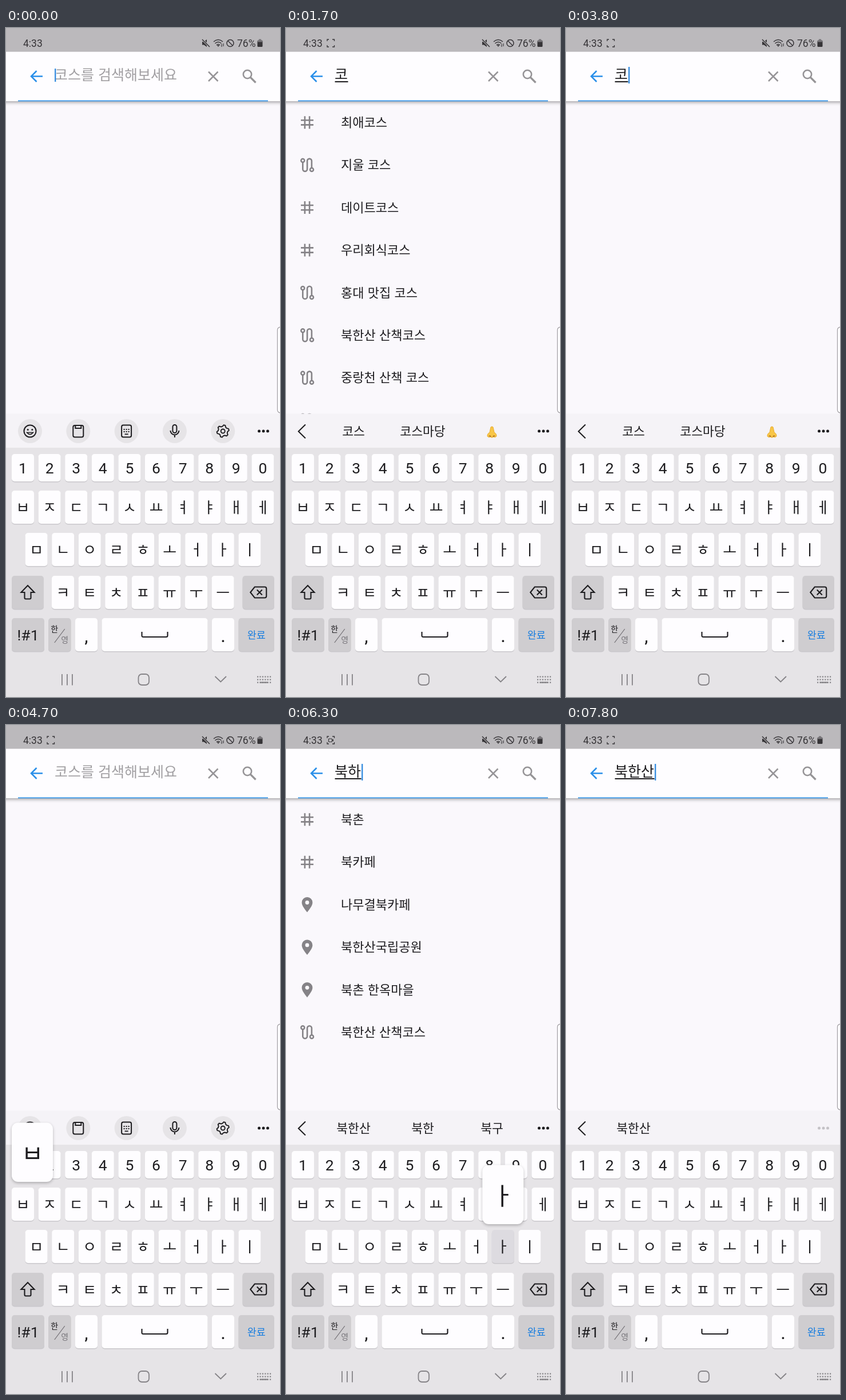
Recreate the animation shown at these times as an HTML page with a canvas. Size 479x1170 px, loop 8000 ms.

```html
<!DOCTYPE html>
<html lang="ko">
<head>
<meta charset="utf-8">
<title>코스 검색</title>
<style>
  html, body { margin: 0; width: 100%; height: 100%; overflow: hidden; background: #faf8fc; }
  canvas { display: block; }
</style>
</head>
<body>
<canvas id="stage" width="479" height="1170"></canvas>
<script>
const ctx = document.getElementById('stage').getContext('2d');
const LOOP = 8000;
const KR = '"Noto Sans CJK KR", "Noto Sans CJK", sans-serif';
const LATIN = 'Roboto, sans-serif';
const INK = '#1d1c1f', GREY = '#858387', BLUE = '#2a8fe9';

// Each stroke: press time, key, resulting text
const strokes = [
  [1000, 'ㅋ', 'ㅋ'], [1050, 'ㅗ', '코'],
  [2300, 'ㅅ', '콧'], [2450, 'ㅡ', '코스'],
  [3400, 'del', '콧'], [3600, 'del', '코'], [3800, 'del', 'ㅋ'], [3950, 'del', ''],
  [4690, 'ㅂ', 'ㅂ'], [4900, 'ㅜ', '부'], [5050, 'ㄱ', '북'],
  [6000, 'ㅎ', '북ㅎ'], [6200, 'ㅏ', '북하'], [6450, 'ㄴ', '북한'],
  [6950, 'ㅅ', '북한ㅅ'], [7150, 'ㅏ', '북한사'], [7450, 'ㄴ', '북한산']
];
const LAG = 50, POPUP = 300;

// First character picks the icon: # tag, ~ route, @ place
const courses = ['#최애코스', '~지울 코스', '#데이트코스', '#우리회식코스', '~홍대 맛집 코스',
  '~북한산 산책코스', '~중랑천 산책 코스', '~'];
const books = ['#북촌', '#북카페', '@나무결북카페', '@북한산국립공원', '@북촌 한옥마을', '~북한산 산책코스'];
const parks = ['@북한산국립공원', '~북한산 산책코스'];
const results = [[0, []], [1500, courses], [2750, []], [2900, courses], [3800, []], [3950, courses],
  [4150, []], [5490, books], [6400, []], [6880, parks], [7400, []]];

const co = ['코스', '코스마당', 'nose'];
const hints = [[0, null], [1200, co], [2600, ['코스마당', '코스프레', '코스길']], [3750, co], [4150, null],
  [5200, ['북한산', '북한', '북구']], [6600, ['북한산', '북한의', '북한이']], [7600, ['북한산']]];

const at = (track, t) => track.filter(e => e[0] <= t).pop()[1];

const STEP = 46.6;
const keys = [];
function addRow(chars, x, y, h) {
  [...chars].forEach((label, i) => keys.push({ label, x: x + i * STEP, y, w: 39, h }));
}
addRow('1234567890', 10, 745, 48);
addRow('ㅂㅈㄷㄱㅅㅛㅕㅑㅐㅔ', 10, 809, 58);
addRow('ㅁㄴㅇㄹㅎㅗㅓㅏㅣ', 33.6, 883, 58);
addRow('ㅋㅌㅊㅍㅠㅜㅡ', 80, 958, 58);
const addKey = (label, x, y, w, dark) => keys.push({ label, x, y, w, h: 58, dark });
addKey('shift', 10, 958, 56, true);
addKey('del', 413.5, 958, 55.5, true);
addKey('!#1', 10, 1032, 57, true);
addKey('lang', 74, 1032, 39.5, true);
addKey(',', 121, 1032, 39);
addKey('space', 167.5, 1032, 185);
addKey('.', 360, 1032, 39);
addKey('완료', 406.5, 1032, 62.5, true);

function rect(x, y, w, h, color) {
  ctx.fillStyle = color;
  ctx.fillRect(x, y, w, h);
}
function box(x, y, w, h, r, fill, stroke, lw = 2) {
  ctx.beginPath();
  ctx.roundRect(x, y, w, h, r);
  if (fill) { ctx.fillStyle = fill; ctx.fill(); }
  if (stroke) { ctx.strokeStyle = stroke; ctx.lineWidth = lw; ctx.stroke(); }
}
function path(d, color, lw, fill) {
  const p = new Path2D(d);
  if (fill) { ctx.fillStyle = fill; ctx.fill(p); }
  if (color) { ctx.strokeStyle = color; ctx.lineWidth = lw; ctx.stroke(p); }
}
function disc(x, y, r, fill, stroke, lw) {
  ctx.beginPath();
  ctx.arc(x, y, r, 0, 7);
  if (fill) { ctx.fillStyle = fill; ctx.fill(); }
  if (stroke) { ctx.strokeStyle = stroke; ctx.lineWidth = lw; ctx.stroke(); }
}
function text(s, x, y, size, { color = INK, font = KR, align = 'left', weight = 400 } = {}) {
  ctx.font = `${weight} ${size}px ${font}`;
  ctx.wordSpacing = `${size * .06}px`;
  ctx.textAlign = align;
  ctx.fillStyle = color;
  ctx.fillText(s, x, y);
}
function shifted(x, y, draw) {
  ctx.save();
  ctx.translate(x, y);
  draw();
  ctx.restore();
}

function statusBar(t) {
  const c = '#363437';
  rect(0, 0, 479, 41.5, '#bbb9bc');
  text('4:33', 30, 32.5, 17.5, { color: c, font: LATIN });
  if (t >= 100) {
    path('M72 23V20H75M81 20H84.5V23M84.5 30V33H81M75 33H72V30', c, 1.3);
    if (t % 1000 < 500) {
      box(74.5, 24, 6, 5.5, 1, null, c, 1.2);
      path('M80.5 26.5L83 24.5V29Z', null, 0, c);
    }
  }
  path('M343 24H346L351 20V33L346 29.5H343Z', null, 0, c);
  path('M343 20L356 33', '#bbb9bc', 3.5);
  path('M343 20L356 33', c, 1.5);
  path('M363 24Q371 17 379 24M365.5 27Q371 22 376.5 27M368 30Q371 27 374 30', c, 1.5);
  path('M369 30L371 33L373 30Z', null, 0, c);
  path('M377 28V33M380 27V32', c, 1.1);
  disc(392, 26.5, 6, null, c, 1.5);
  path('M388 22.5L396 30.5', c, 1.5);
  text('76%', 404, 32.5, 17.5, { color: c, font: LATIN });
  box(439.5, 21.5, 9, 11.5, 1.5, c);
  rect(442, 19.5, 4, 2, '#777579');
  rect(440, 22, 8, 2.5, '#777579');
}

function searchBar(t, value, cursorOn) {
  ctx.save();
  ctx.shadowColor = 'rgba(0,0,0,.38)';
  ctx.shadowBlur = 6;
  ctx.shadowOffsetY = 2;
  rect(-10, 41.5, 499, 86.5, '#fefdff');
  ctx.restore();
  rect(21, 126.5, 437, 1.8, '#3a97e8');
  path('M64 84.5H45M53.5 75L44 84.5L53.5 94', BLUE, 2.5);
  path('M354 76.5L370.5 93M370.5 76.5L354 93', '#969497', 2.5);
  disc(422, 81, 7.2, null, '#969497', 2.6);
  path('M427 86L436.5 95.5', '#969497', 3.2);

  if (value) {
    text(value, 85, 90, 25);
    rect(85.5, 93, ctx.measureText(value).width, 2, INK);
  } else {
    text('코스를 검색해보세요', 85, 90.5, 25, { color: '#a19fa2' });
  }
  if (cursorOn) {
    const n = value.length;
    if (n) rect(86 + 23 * n, 68, 2.4, 29, '#3a8fe0');
    else rect(85, 71, 2.4, 23, '#3a8fe0');
  }
}

const listIcons = {
  '#': () => path('M-4.1 -11V11M4.1 -11V11M-11 -4.1H11M-11 4.1H11', GREY, 2.6),
  '~': () => {
    disc(-7.7, -8, 3, null, GREY, 2.5);
    disc(8, 8, 3, null, GREY, 2.5);
    path('M-7.7 -5V7A3.9 3.9 0 0 0 .1 7V-7.2A3.9 3.9 0 0 1 7.9 -7.2V5', GREY, 2.6);
  },
  '@': () => {
    path('M0 13.5C-4 8 -9.4 2 -9.4 -3.6A9.4 9.4 0 0 1 9.4 -3.6C9.4 2 4 8 0 13.5Z', null, 0, GREY);
    disc(0, -3.6, 3.4, '#faf8fc');
  }
};

function resultList(rows) {
  rows.forEach((row, i) => {
    const y = 165.3 + i * 74.4;
    shifted(37, y, listIcons[row[0]]);
    text(row.slice(1), 96, y + 7.7, 22);
  });
}

const tools = [
  () => {
    disc(0, 0, 10.5, null, INK, 2);
    disc(-3.8, -2.5, 1.5, INK);
    disc(3.8, -2.5, 1.5, INK);
    path('M-5.5 2.5Q0 9 5.5 2.5Z', INK, 1.5);
  },
  () => {
    box(-9, -10, 18, 20.5, 3, null, INK);
    path('M-5 -10V-5H5V-10', INK, 2);
  },
  () => {
    box(-8.5, -10.5, 17, 21, 3, null, INK);
    for (let i = 0; i < 6; i++) rect(-5 + i % 3 * 4, -4 + (i > 2) * 4, 2, 2, INK);
    rect(-3, 4.5, 6, 1.8, INK);
  },
  () => {
    box(-3.5, -11, 7, 14, 3.5, null, INK);
    path('M-7.5 -1A7.5 7.5 0 0 0 7.5 -1M0 6.5V11', INK, 2);
  },
  () => {
    ctx.beginPath();
    for (let i = 0; i < 24; i++) {
      const a = (i + .5) * Math.PI / 12, r = i % 4 < 2 ? 8.2 : 10.7;
      ctx.lineTo(r * Math.cos(a), r * Math.sin(a));
    }
    ctx.closePath();
    ctx.strokeStyle = INK;
    ctx.lineWidth = 1.9;
    ctx.stroke();
    disc(0, 0, 3.5, null, INK, 1.9);
  }
];

function nose(x, y) {
  shifted(x, y, () => {
    path('M-2 -9Q0 -11 2 -9L4 0Q9 3 8 7Q6 10 2 8Q0 11 -2 8Q-6 10 -8 7Q-9 3 -4 0Z', '#e8ad35', 1, '#f8c648');
    path('M-5 7Q-3 5 -2 8M5 7Q3 5 2 8', '#a96a20', 1.4);
  });
}

function hintStrip(words) {
  rect(0, 674.5, 479, 60, '#f5f3f7');
  const faded = words && words.length === 1;
  for (const x of [442.5, 450, 457.5]) disc(x, 705, 2.5, faded ? '#c4c2c6' : INK);
  if (!words) {
    tools.forEach((icon, i) => {
      const x = 42 + i * 84.3;
      disc(x, 705, 21, '#e6e4e7');
      shifted(x, 705, icon);
    });
    return;
  }
  path('M34 693.5L21.8 705.5L34 717.5', INK, 2);
  words.forEach((word, i) => {
    const x = 118 + i * 121;
    if (word === 'nose') nose(x, 707);
    else text(word, x, 713, 21.6, { align: 'center' });
  });
}

const glyphs = {
  shift: () => path('M0 -12L11.5 0H5.5V9.5Q5.5 11.5 3.5 11.5H-3.5Q-5.5 11.5 -5.5 9.5V0H-11.5Z', INK, 2.1),
  del: () => {
    path('M-14 0L-6.5 -9.5H11Q14 -9.5 14 -6.5V6.5Q14 9.5 11 9.5H-6.5Z', INK, 2.1);
    path('M-2.5 -4.5L6.5 4.5M6.5 -4.5L-2.5 4.5', INK, 2.1);
  },
  space: () => path('M-22.5 -5V1.5Q-22.5 4 -20 4H20Q22.5 4 22.5 1.5V-5', INK, 2.1),
  lang: () => {
    text('한', -9, -5, 14, { align: 'center' });
    path('M-9 14L9 -10', '#69676b', 1.1);
    text('영', 9, 14, 14, { align: 'center', color: '#77757a' });
  }
};

function drawKey(k, pressed) {
  const cx = k.x + k.w / 2, cy = k.y + k.h / 2;
  box(k.x, k.y + 1.5, k.w, k.h, 5, '#cac8cc');
  box(k.x, k.y, k.w, k.h, 5, pressed ? (k.dark ? '#b5b3b8' : '#dddbe0') : k.dark ? '#cfcdd0' : '#fefdff');
  if (glyphs[k.label]) shifted(cx, cy, glyphs[k.label]);
  else if (k.label === '완료') text(k.label, cx, cy + 6.5, 17.5, { color: '#167de0', align: 'center', weight: 500 });
  else if (/[ㄱ-ㅣ]/.test(k.label)) text(k.label, cx, cy + 10, 26, { align: 'center', weight: 500 });
  else if (/[,.]/.test(k.label)) text(k.label, cx, 1074, 27, { font: LATIN, align: 'center', weight: 500 });
  else text(k.label, cx, cy + 9.5, 26.5, { font: LATIN, align: 'center' });
}

function popup(k) {
  const cx = Math.min(433, Math.max(46, k.x + k.w / 2));
  const top = k.y - 113.5;
  ctx.save();
  ctx.shadowColor = 'rgba(0,0,0,.25)';
  ctx.shadowBlur = 5;
  ctx.shadowOffsetY = 2;
  box(cx - 36, top, 72, 103.5, 11, '#fefdff');
  ctx.restore();
  text(k.label, cx, top + 69, 42, { align: 'center', weight: 500 });
}

function navBar() {
  for (const x of [98, 107, 116]) rect(x - 1, 1130, 1.8, 19.5, GREY);
  box(231.5, 1130, 18.5, 19, 6, null, GREY, 1.8);
  path('M365.5 1134L375.3 1143.5L385 1134', GREY, 1.8);
  for (let row = 0; row < 3; row++)
    for (let i = 0; i < 6; i++) rect(439 + i * 4.4, 1133.5 + row * 5, 2.2, 2.2, GREY);
  rect(444, 1143.5, 14, 2.2, GREY);
}

function keyboard(t) {
  rect(0, 734, 479, 436, '#e6e4e7');
  const age = ([time]) => t - time;
  const held = strokes.filter(s => age(s) >= 50 && age(s) < 180).map(s => s[1]);
  keys.forEach(k => drawKey(k, held.includes(k.label)));
  navBar();
  strokes.filter(s => s[1] !== 'del' && age(s) >= 0 && age(s) < POPUP)
    .forEach(s => popup(keys.find(k => k.label === s[1])));
}

function draw(t) {
  const last = strokes.filter(s => s[0] + LAG <= t).pop() || [-300 - LAG, '', ''];
  const cursorOn = (t - last[0] - LAG) % 1000 < 500;
  rect(0, 0, 479, 1170, '#faf8fc');
  resultList(at(results, t));
  searchBar(t, last[2], cursorOn);
  statusBar(t);
  box(474.5, 523, 20, 150, 5, '#fdfcfe', '#a19fa3', 1.2);
  hintStrip(at(hints, t));
  keyboard(t);
}

const start = performance.now();
function tick() {
  draw((performance.now() - start) % LOOP);
  requestAnimationFrame(tick);
}
tick();
</script>
</body>
</html>
```
